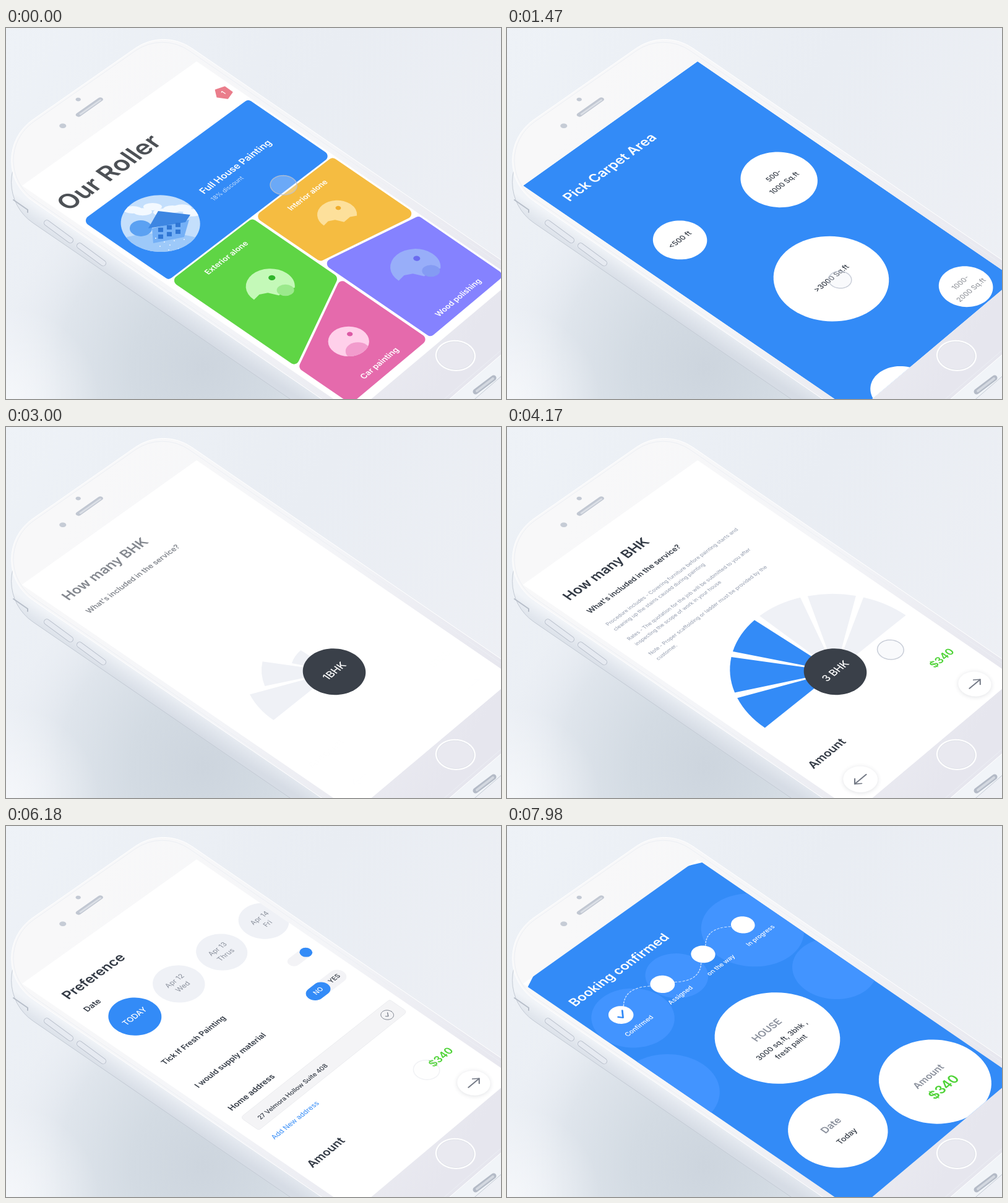
Write an HTML page with a canvas that moves like this. It is 800 px wide and 600 px high and loops after 8 s.

```html
<!DOCTYPE html>
<html lang="en">
<head>
<meta charset="utf-8">
<title>Painting service booking</title>
<style>
html, body { margin: 0; width: 100%; height: 100%; overflow: hidden; background: #eef1f6; }
canvas { display: block; width: 800px; height: 600px; }
</style>
</head>
<body>
<canvas id="stage" width="800" height="600"></canvas>
<script>
const ctx = document.getElementById('stage').getContext('2d');
const LOOP = 8000;
const BLUE = '#338bf7', DARK = '#3a4049', INK = '#333a45', GREEN = '#4fd337', PALE = '#eff1f6', GRAY = '#8a909c';

// Layout is in units of the phone screen (W x H), seen in perspective.
const W = 375, H = 667, MARGIN = 23, HUB = [191, 455], NEXT = [321, 629];

// ---- timing ----
const seg = (t, a, b) => Math.min(1, Math.max(0, (t - a) / (b - a)));
const out = p => 1 - (1 - p) ** 3;
const smooth = p => p * p * (3 - 2 * p);
const mix = (a, b, p) => a + (b - a) * p;
const between = (t, inA, inB, outA, outB) => seg(t, inA, inB) * (1 - seg(t, outA, outB));

// ---- projection ----
function at(x, y) {
  const u = x / W, v = y / H, depth = 1 + 0.0464 * u;
  return [(26 + 296.3 * u + 537 * v) / depth, (255 - 198.5 * u + 368 * v) / depth];
}

// Draws in the tilted plane with its origin at x, y.
function tilted(x, y, draw) {
  const [px, py] = at(x, y), depth = 1 + 0.0464 * x / W;
  ctx.save();
  ctx.transform((296.3 - 0.0464 * px) / depth / W, (-198.5 - 0.0464 * py) / depth / W,
    537 / depth / H, 368 / depth / H, px, py);
  draw();
  ctx.restore();
}

// ---- drawing helpers ----
function group(alpha, draw, down = 0) {
  if (alpha <= 0) return;
  ctx.save();
  ctx.globalAlpha *= alpha;
  ctx.translate(down * 537 / H, down * 368 / H);
  draw();
  ctx.restore();
}

function paint(fill, stroke, width = 1) {
  if (fill) { ctx.fillStyle = fill; ctx.fill(); }
  if (stroke) { ctx.strokeStyle = stroke; ctx.lineWidth = width; ctx.stroke(); }
}

function text(str, x, y, size, color = INK, weight = 600, align = 'left', leading = 22) {
  tilted(x, y, () => {
    ctx.font = `${weight} ${size}px Inter, "Open Sans", sans-serif`;
    ctx.fillStyle = color;
    ctx.textAlign = align;
    ctx.textBaseline = align === 'center' ? 'middle' : 'alphabetic';
    const lines = str.split('\n');
    const top = align === 'center' ? (1 - lines.length) / 2 : 0;
    lines.forEach((line, i) => ctx.fillText(line, 0, (top + i) * leading));
  });
}

const label = (str, x, y, size, color, weight = 500, leading) => text(str, x, y, size, color, weight, 'center', leading);
const title = (str, color) => text(str, MARGIN, 71, 22.6, color);

function disc(x, y, r, fill, stroke, width) {
  ctx.beginPath();
  for (let a = 0; a < 6.28; a += 0.08) ctx.lineTo(...at(x + r * Math.cos(a), y + r * Math.sin(a)));
  ctx.closePath();
  paint(fill, stroke, width);
}

const box = (x0, y0, x1, y1) => [[x0, y0], [x1, y0], [x1, y1], [x0, y1]];

function poly(points, radius, fill, stroke) {
  const p = points.map(q => at(...q)), n = p.length;
  ctx.beginPath();
  ctx.moveTo((p[n - 1][0] + p[0][0]) / 2, (p[n - 1][1] + p[0][1]) / 2);
  p.forEach((q, i) => ctx.arcTo(...q, ...p[(i + 1) % n], radius));
  ctx.closePath();
  paint(fill, stroke);
}

// Polygon or polyline in the current coordinates.
function trace(points) {
  ctx.beginPath();
  points.forEach(p => ctx.lineTo(...p));
}

function line(points, color, width) {
  trace(points);
  ctx.lineCap = ctx.lineJoin = 'round';
  paint(null, color, width);
}

function pill(x, y, w, h, fill) {
  tilted(x, y, () => {
    ctx.beginPath();
    ctx.roundRect(-w / 2, -h / 2, w, h, h / 2);
    paint(fill);
  });
}

function gradient(x0, y0, x1, y1, ...colors) {
  const g = ctx.createLinearGradient(x0, y0, x1, y1);
  colors.forEach((c, i) => g.addColorStop(i / (colors.length - 1), c));
  return g;
}

function glow(x, y, r, ...colors) {
  const g = ctx.createRadialGradient(x, y, 0, x, y, r);
  colors.forEach((c, i) => g.addColorStop(i / (colors.length - 1), c));
  ctx.fillStyle = g;
  ctx.fillRect(0, 280, 500, 320);
}

function arrowButton(x, y, dir) {
  ctx.save();
  ctx.shadowColor = 'rgba(60,70,90,.16)';
  ctx.shadowBlur = 7;
  ctx.shadowOffsetY = 1;
  disc(x, y, 26, '#fff');
  ctx.restore();
  tilted(x, y, () => {
    ctx.scale(dir, 1);
    line([[-13, 0], [13, 0]], '#747a86', 2);
    line([[5, -7], [13, 0], [5, 7]], '#747a86', 2);
  });
}

// ---- phone ----
function phone() {
  ctx.fillStyle = gradient(0, 0, 800, 500, '#eef2f7', '#e9edf3', '#eef0f5');
  ctx.fillRect(0, 0, 800, 600);
  glow(320, 550, 350, '#cdd5de', '#d3dbe3', '#dfe5ec', 'rgba(238,241,247,0)');
  glow(0, 600, 150, 'rgba(246,248,251,.9)', 'rgba(246,248,251,0)');

  const body = box(-12, -85, 391, 755);
  ctx.save();
  ctx.translate(0, 35);
  poly(body, 80, gradient(100, 285, 80, 317, '#f1f4f8', '#e2e7ee', '#d6dce5'), '#c3cad4');
  ctx.restore();
  poly(body, 80, gradient(130, 120, 740, 520, '#f8f8f9', '#f4f5f8', '#e6e6ee'), '#fff');
  poly(box(-8, -81, 384, 749), 76, null, '#eceff4');

  disc(W / 2, -68, 3.8, '#c3c9d4');
  disc(131, -45, 5, '#c6ccd6');
  pill(W / 2, -45, 55, 8, '#c1c7d2');
  pill(W / 2 + 1, -44, 46, 3, '#dbdfe6');
  disc(HUB[0], 704, 30, '#e9e9f0', '#fff', 2.5);
  disc(HUB[0], 704, 28.5, null, '#d9dce4', 0.8);

  // side keys and connector
  line([[12, 278], [35, 294], [35, 298]], '#b7bec9', 2);
  for (const x of [66, 119]) {
    const key = [[x, x * 0.7 + 269], [x + 38, x * 0.7 + 297]];
    line(key, '#b9c0cc', 10);
    line(key, '#e6eaf1', 8);
  }
  line([[759, 588], [788, 566]], '#b4bbc7', 9);
  line([[761, 587], [787, 567]], '#d3d8e0', 4);
}

// ---- home page ----
function houseArt(x, y) {
  ctx.save();
  disc(x, y, 58.5, '#c4dffc');
  ctx.clip();
  ctx.translate(...at(x, y));
  const blob = (bx, by, rx, ry, color) => {
    ctx.beginPath();
    ctx.ellipse(bx, by, rx, ry, 0, 0, 7);
    paint(color);
  };
  for (let i = 0; i < 7; i++) blob(-45 + i * 16, -22 + 5 * Math.sin(i * 2.4), 15, 6, '#f3f9ff');
  blob(0, 46, 90, 30, '#9dc9f9');
  blob(-32, 8, 18, 13, '#5ba1f2');
  trace([[-14, 8], [46, -6], [38, 22], [-12, 32]]);
  paint('#74b0f6');
  trace([[-20, 8], [-4, -20], [48, -14], [40, -2]]);
  paint('#3d86e2');
  for (let i = 0; i < 6; i++) {
    ctx.fillStyle = '#2f76d4';
    ctx.fillRect(-4 + (i % 3) * 14, 7 - (i % 3) * 4 + (i > 2) * 11, 8, 7);
  }
  for (let i = 0; i < 10; i++) blob(-8 + (i * 23) % 62, 24 + (i * 11) % 20, 1.1, 1, '#e3f0fe');
  ctx.restore();
}

function birdIcon(x, y, r, pale, spot, wing, whole) {
  ctx.save();
  ctx.translate(...at(x, y));
  ctx.scale(r * 1.07, r * 0.78);
  const blob = (bx, by, br, color) => {
    ctx.beginPath();
    ctx.arc(bx, by, br, 0, 7);
    paint(color);
  };
  ctx.beginPath();
  ctx.arc(0, 0, 1, whole ? 0 : 2.3, whole ? 7 : 6.35);
  if (!whole) [[0.65, 0.15], [0.35, 0.5], [-0.1, 0.35], [-0.45, 0.45]].forEach(p => ctx.lineTo(...p));
  ctx.closePath();
  paint(pale);
  ctx.clip();
  if (whole) blob(0.45, 0.65, 0.6, wing);
  ctx.restore();
  if (wing && !whole) {
    const [cx, cy] = at(x, y);
    ctx.beginPath();
    ctx.ellipse(cx + r * 0.66, cy + r * 0.16, r * 0.38, r * 0.25, 0, 0, 7);
    paint(wing);
  }
  disc(x + r * 0.4, y - r * 0.28, r * 0.14, spot);
}

function home(t) {
  const left = 10, midLeft = 188, midRight = 193, right = 371, top = 289, bottom = 651;
  text('Our Roller', 9, 85, 41, '#4d5156');
  tilted(354, 76, () => {
    trace([0, 1, 2, 3, 4].map(i => [13 * Math.cos(i * 1.257 - 0.6), 13 * Math.sin(i * 1.257 - 0.6)]));
    ctx.closePath();
    ctx.lineJoin = 'round';
    paint('#ea7d8b', '#ea7d8b', 3);
  });
  label('1', 354, 76, 11, '#fff', 600);

  poly([[left, top], [midLeft, top], [midLeft, 466], [left, 541]], 8, '#5fd545');
  poly([[midRight, top], [right, top], [right, 465], [midRight, 424]], 8, '#f5bc41');
  poly([[midRight, 428], [right, 470], [right, bottom], [midRight, bottom]], 8, '#8582ff');
  poly([[left, 545], [midLeft, 470], [midLeft, bottom], [left, bottom]], 8, '#e56aac');
  birdIcon(103, 404, 37, '#c4f9b8', '#2fb52a', '#9be98c');
  birdIcon(284, 377, 30, '#fde09b', '#f0ad2c');
  birdIcon(286, 538, 38, '#98aef9', '#6a6bf0', '#849bf3');
  birdIcon(101, 565, 31, '#ffd0ea', '#dc5aa5', '#f29ccd', true);
  label('Exterior alone', 101, 317, 13.3, '#fff', 600);
  label('Interior alone', 283, 317, 13.3, '#fff', 600);
  label('Wood polishing', 284, 629, 13.7, '#fff', 600);
  label('Car painting', 100, 629, 13.7, '#fff', 600);

  const grow = smooth(seg(t, 290, 600));
  poly(box(mix(9, 0, grow), mix(112, 0, grow), mix(right, W, grow), mix(286, H, grow)), mix(8, 0, grow), BLUE);
  group(1 - seg(t, 270, 400), () => {
    houseArt(85, 198);
    text('Full House Painting', 174, 203, 16.3, '#fff');
    text('18% discount', 174, 223, 10.5, 'rgba(255,255,255,.75)', 400);
  });
}

// ---- carpet area page ----
const BUBBLES = [
  [79, 241, 40, '<500 ft'], [276, 262, 59, '500-\n1000 Sq.ft'],
  [309, 621, 60, '1000-\n2000 Sq.ft'], [82, 686, 65, '2000-\n3000 Sq.ft']];

function carpet(t) {
  poly(box(0, 0, W, H), 0, BLUE);
  group(between(t, 560, 720, 2200, 2420), () => title('Pick Carpet Area', '#fff'));
  BUBBLES.forEach(([x, y, r, name], i) => {
    const leave = y > 500 ? 1400 : 1650;
    const size = out(seg(t, 500 + i * 25, 760 + i * 15)) * (1 - smooth(seg(t, leave, leave + 200)));
    disc(x, y, r * size, '#fff');
    group(size * size, () => label(name, x, y, 12.5));
  });
  group(between(t, 1750, 1950, 2440, 2580), () => arrowButton(...NEXT, 1));

  const shrink = smooth(seg(t, 2300, 2580)), tint = seg(t, 1500, 1700);
  const x = mix(178, HUB[0], shrink), y = mix(459, HUB[1], shrink);
  const shade = [58, 64, 73].map(v => mix(255, v, tint));
  disc(x, y, mix(88, 48, shrink) * out(seg(t, 510, 780)), `rgb(${shade})`);
  group(between(t, 620, 760, 2300, 2430), () => label('>3000 Sq.ft', x, y, 12.7, tint > 0.5 ? '#fff' : INK));
  group(seg(t, 2430, 2560), () => label('1BHK', x, y, 17.5, '#fff'));
}

// ---- room count page ----
const NOTES = [
  'Procedure includes - Covering furniture before painting starts and\ncleaning up the stains caused during painting',
  'Rates - The quotation for the job will be submitted to you after\ninspecting the scope of work in your house',
  'Note - Proper scaffolding or ladder must be provided by the\ncustomer.'];

function footer(price) {
  text('Amount', MARGIN - 2, 564, 19.3);
  text(price, 302, 562, 18.5, GREEN);
  arrowButton(...NEXT, 1);
}

function rooms(t) {
  disc(...HUB, smooth(seg(t, 2640, 2940)) * 560, '#fff');
  const count = 1 + (t > 3520) + (t > 3780);
  const leave = 1 - seg(t, 4870, 5000);
  group(seg(t, 2850, 3100) * leave, () => {
    title('How many BHK');
    text("What's included in the service?", MARGIN + 2, 111, 12.6);
  });
  group(seg(t, 3000, 3350) * leave, () => {
    NOTES.forEach((note, i) => text(note, MARGIN + 2, 147 + i * 43, 8.8, '#929bad', 400, 'left', 15));
    footer('$' + [120, 230, 340][count - 1]);
    arrowButton(W - NEXT[0], NEXT[1], -1);
  });
  tilted(...HUB, () => {
    const step = Math.PI * 0.1705, wide = step - 0.073;
    for (let i = 0; i < 6; i++) {
      const r = 161 * out(seg(t, 2880 + i * 40, 3130 + i * 40)) * (1 - smooth(seg(t, 4700, 4870)));
      ctx.beginPath();
      ctx.moveTo(0, 0);
      ctx.arc(0, 0, r, Math.PI + i * step, Math.PI + i * step + wide);
      paint(i < count && t > 3200 ? BLUE : PALE);
    }
  });
  group(leave, () => {
    disc(...HUB, 48, DARK);
    label(count === 1 ? '1BHK' : count + ' BHK', HUB[0] + 1, HUB[1], 17.5, '#fff');
  });
}

// ---- preference page ----
function rise(t, start, draw) {
  group(seg(t, start, start + 100), draw, 250 * (1 - out(seg(t, start, start + 800))));
}

function toggle(y, w, h, knob, on) {
  const reach = (w - knob) / 2, x = 356 - w / 2;
  pill(x, y, w, h, '#f3f3f6');
  pill(x + mix(-reach, reach, on), y, knob, h, BLUE);
}

function preference(t) {
  const row = i => 264 + i * 67.5;
  rise(t, 5025, () => {
    title('Preference');
    text('Date', MARGIN + 1, 108, 13.5);
    ['TODAY', 'Apr 12\nWed', 'Apr 13\nThrus', 'Apr 14\nFri'].forEach((day, i) => {
      const x = 66 + i * 94.7;
      disc(x, 164, 39, i ? PALE : BLUE);
      label(day, x, 164, i ? 12 : 13.5, i ? GRAY : '#fff', i ? 400 : 500, 17);
    });
  });
  rise(t, 5100, () => {
    text('Tick If Fresh Painting', MARGIN + 1, row(0), 13);
    text('I would supply material', MARGIN + 1, row(1), 13.2);
    toggle(row(0) - 8, 48, 20, 20, 1);
    const yes = smooth(seg(t, 6700, 6900));
    toggle(row(1) - 6, 80, 28, 43, yes);
    label('NO', 298, row(1) - 6, 11.5, yes > 0.5 ? INK : '#fff');
    label('YES', 335, row(1) - 6, 11.5, yes > 0.5 ? '#fff' : INK);
  });
  rise(t, 5267, () => {
    text('Home address', MARGIN + 1, row(2), 13.6);
    poly(box(MARGIN, 417, 362, 454), 4, '#f4f4f6', '#ebecef');
    text('27 Velmora Hollow Suite 408', 40, 442, 10.8, INK, 500);
    text('Add New address', MARGIN + 2, 484, 11.8, BLUE, 400);
    disc(335, 436, 10, null, '#737985');
    tilted(335, 436, () => line([[-4, 0], [-1, 3], [4, -3]], '#737985', 1.3));
  });
  group(seg(t, 5850, 6050), () => footer('$340'));
}

// ---- confirmation page ----
function summary(x, y, r, heading, body, size, color, pop, fade) {
  disc(x, y, r * pop, '#fff');
  const lines = body.split('\n').length;
  group(fade, () => {
    label(heading, x, y - 6 - 8 * lines, 16.7, GRAY, 600);
    label(body, x, y + 18, size, color, color === INK ? 500 : 600, 19);
  });
}

function booking(t) {
  const p = out(seg(t, 7500, 7980));
  ctx.save();
  disc(mix(NEXT[0], W / 2, p), mix(NEXT[1], 400, p), 433.5 * p, BLUE);
  ctx.clip();
  group(seg(t, 7580, 7740), () => {
    [[61, 163, 61], [170, 149, 47], [323, 164, 79], [351, 310, 66], [-13, 303, 76]]
      .forEach(circle => disc(...circle, '#4294ff'));
    text('Booking confirmed', 18, 87, 21.6, '#fff');
    ['Confirmed', 'Assigned', 'on the way', 'In progress'].forEach((step, i) => {
      const x = 53 + i * 89, y = 146, bend = i % 2 ? 1 : -1;
      if (i < 3) tilted(x, y, () => {
        ctx.beginPath();
        ctx.setLineDash([3, 3]);
        ctx.moveTo(16, 10 * bend);
        ctx.quadraticCurveTo(44, 36 * bend, 73, 10 * bend);
        paint(null, 'rgba(255,255,255,.75)', 1.3);
      });
      disc(x, y, 18.3, '#fff');
      label(step, x + 2, y + 35, 11, '#fff');
    });
    tilted(53, 146, () => line([[-6, 0], [-2, 6], [8, -5]], BLUE, 2.6));
  });
  const pop = out(seg(t, 7620, 7860)), fade = seg(t, 7700, 7860);
  summary(181, 346, 95, 'HOUSE', '3000 sq.ft, 3bhk ,\nfresh paint', 12.8, INK, pop, fade);
  summary(103, 540, 75.5, 'Date', 'Today', 13.5, INK, pop, fade);
  summary(281, 582, 88, 'Amount', '$340', 23, GREEN, pop, fade);
  ctx.restore();
}

// ---- touch pointer: time, x, y ----
const TOUCHES = [
  [[-200, 330, 310], [0, 273, 276], [200, 230, 235], [360, 230, 235]],
  [[950, 330, 570], [1350, 185, 470], [1800, 185, 470], [2330, 328, 629], [2680, 328, 629]],
  [[3150, 60, 500], [3560, 100, 405], [3920, 145, 365], [4170, 284, 486], [4460, 328, 627], [4750, 328, 627]],
  [[6150, 290, 560], [6620, 334, 325], [6950, 334, 325], [7380, 330, 625], [7570, 330, 625]]];
const TAPS = [250, 1470, 2520, 4600, 6700, 7520];

function pointer(t) {
  const path = TOUCHES.find(p => t >= p[0][0] && t < p[p.length - 1][0]);
  if (!path) return;
  const i = path.findIndex(key => key[0] > t), start = path[0][0], end = path[path.length - 1][0];
  const [t0, x0, y0] = path[i - 1], [t1, x1, y1] = path[i];
  const p = smooth(seg(t, t0, t1));
  const press = Math.max(...TAPS.map(tap => 1 - Math.min(1, Math.abs(t - tap) / 60)));
  group(between(t, start, start + 120, end - 70, end), () =>
    disc(mix(x0, x1, p), mix(y0, y1, p), 20.5 - 3 * press, 'rgba(236,238,243,.3)', 'rgba(188,194,207,.8)', 1.5));
}

function render(t) {
  phone();
  ctx.save();
  poly(box(0, 0, W, H), 0, '#fff');
  ctx.clip();
  if (t < 600) home(t);
  if (t >= 600 && t < 2960) carpet(t);
  if (t >= 2640 && t < 5000) rooms(t);
  if (t >= 5000) preference(t);
  if (t >= 7500) booking(t);
  pointer(t);
  ctx.restore();
}

const began = performance.now();
function frame() {
  render((performance.now() - began) % LOOP);
  requestAnimationFrame(frame);
}
frame();
</script>
</body>
</html>
```
